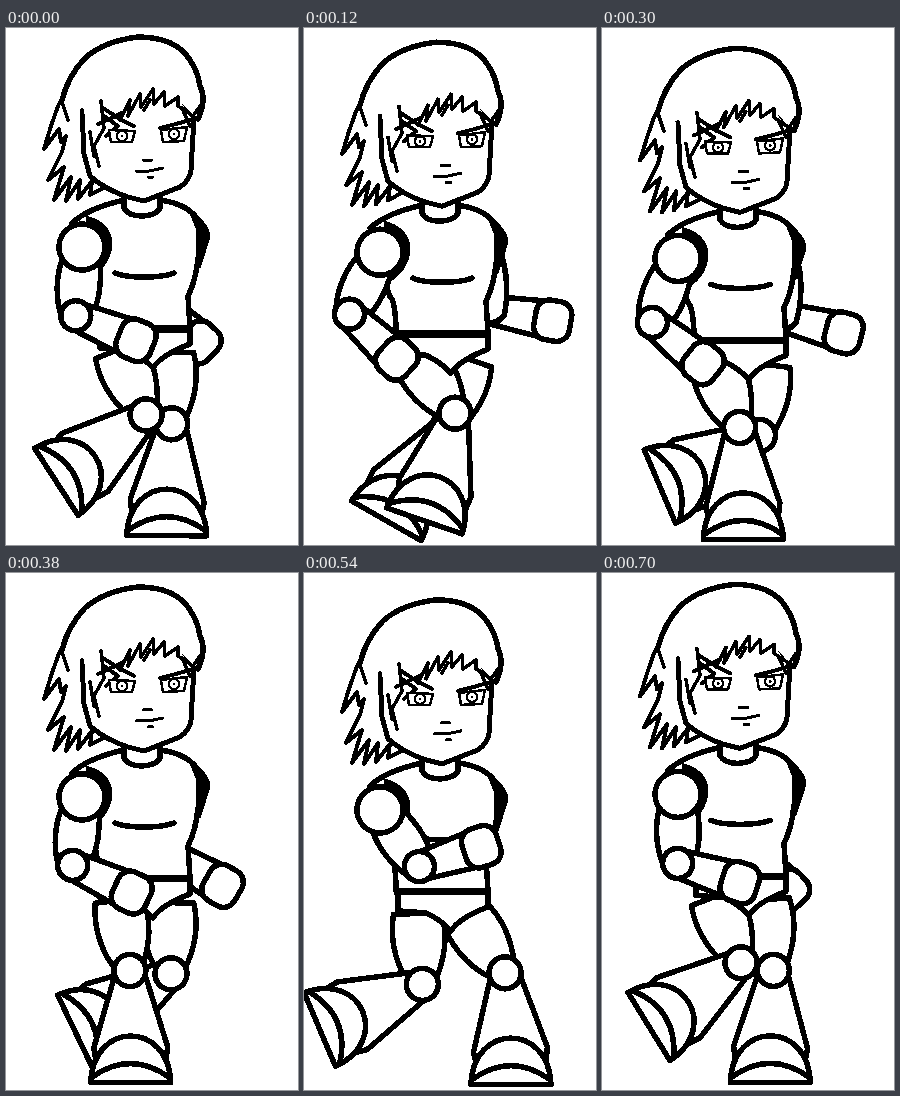
These frames come from a looping animation (292 by 517 pixels, 720 ms). An HTML page without scripts:

```html
<!DOCTYPE html>
<html lang="en">
<head>
<meta charset="utf-8">
<title>Walk cycle</title>
<style>
  @property --bob { syntax: "<length>"; inherits: true; initial-value: 0px; }
  @property --near-arm { syntax: "<angle>"; inherits: true; initial-value: 0deg; }
  @property --far-arm { syntax: "<angle>"; inherits: true; initial-value: 0deg; }
  @property --near-hip { syntax: "<angle>"; inherits: true; initial-value: 0deg; }
  @property --near-knee { syntax: "<angle>"; inherits: true; initial-value: 0deg; }
  @property --near-foot { syntax: "<angle>"; inherits: true; initial-value: 0deg; }
  @property --far-hip { syntax: "<angle>"; inherits: true; initial-value: 0deg; }
  @property --far-knee { syntax: "<angle>"; inherits: true; initial-value: 0deg; }
  @property --far-foot { syntax: "<angle>"; inherits: true; initial-value: 0deg; }

  html, body { margin: 0; width: 100%; height: 100%; overflow: hidden; background: #fff; }
  svg { display: block; width: 100%; height: 100%; }

  .figure {
    fill: #fff; stroke: #000; stroke-width: 5.5;
    stroke-linejoin: round; stroke-linecap: round;
    shape-rendering: crispEdges;
    transform: translateY(var(--bob));
    animation: walk 720ms linear infinite;
  }
  .line { fill: none; }
  .thin { stroke-width: 2.5; }
  .solid { fill: #000; stroke-width: 1; }

  .arm, .leg { transform: translate(var(--x), var(--y)) rotate(var(--turn)); }
  .forearm { transform: translateY(69px) rotate(-73deg); }
  .shin { transform: translateY(67px) rotate(var(--bend)); }
  .foot { transform: translateY(85px) rotate(var(--tilt)); }

  .near.arm { --x: 76px; --y: 219px; --turn: var(--near-arm); }
  .far.arm { --x: 176px; --y: 208px; --turn: var(--far-arm); }
  .near.leg { --x: 110px; --y: 327px; --turn: var(--near-hip); --bend: var(--near-knee); --tilt: var(--near-foot); }
  .far.leg { --x: 160px; --y: 329px; --turn: var(--far-hip); --bend: var(--far-knee); --tilt: var(--far-foot); }

  @keyframes walk {
    0%, 100% { --bob: 0px; --near-arm: 5deg; --far-arm: 26deg;
      --near-hip: -26.6deg; --near-knee: 79deg; --near-foot: 5deg;
      --far-hip: -5deg; --far-knee: 8deg; --far-foot: -3deg; }
    16.667% { --bob: 5px; --near-arm: 26deg; --far-arm: -7deg;
      --near-hip: -37.7deg; --near-knee: 53deg; --near-foot: 4deg;
      --far-hip: 14deg; --far-knee: 20deg; --far-foot: -5deg; }
    25% { --bob: 18px; --near-arm: 40deg; --far-arm: -22deg;
      --near-hip: -40deg; --near-knee: 32deg; --near-foot: 8deg;
      --far-hip: 11deg; --far-knee: 55deg; --far-foot: 3deg; }
    30.556% { --bob: 18px; --near-arm: 36deg; --far-arm: -18deg;
      --near-hip: -37deg; --near-knee: 33deg; --near-foot: 4deg;
      --far-hip: 8.5deg; --far-knee: 56.5deg; --far-foot: 4deg; }
    52.778% { --bob: 5px; --near-arm: 8deg; --far-arm: 13deg;
      --near-hip: -12deg; --near-knee: 11deg; --near-foot: 1deg;
      --far-hip: -4deg; --far-knee: 62deg; --far-foot: 7deg; }
    63.889% { --bob: 4px; --near-arm: -12deg; --far-arm: 25deg;
      --near-hip: -10.3deg; --near-knee: 37.3deg; --near-foot: -1deg;
      --far-hip: -23deg; --far-knee: 43deg; --far-foot: -5deg; }
    75% { --bob: 18px; --near-arm: -35deg; --far-arm: 43deg;
      --near-hip: -7deg; --near-knee: 73deg; --near-foot: 1deg;
      --far-hip: -38deg; --far-knee: 34deg; --far-foot: 4deg; }
    97.222% { --bob: 2.5px; --near-arm: 0deg; --far-arm: 30deg;
      --near-hip: -25.6deg; --near-knee: 80deg; --near-foot: 4deg;
      --far-hip: -10deg; --far-knee: 12deg; --far-foot: -2deg; }
  }
</style>
</head>
<body>
<svg viewBox="0 0 292 517">
  <defs>
    <g id="arm">
      <path d="M-18 12C-24 32-21 55-15 69H15C22 55 23 35 19 12Z"/>
      <g class="forearm">
        <path d="M-14 4L-18 52H18L14 4Z"/>
        <circle r="15"/>
        <rect x="-20" y="47" width="40" height="36" rx="13"/>
      </g>
    </g>
    <g id="leg">
      <path d="M-20-6C-28 22-22 48-13 64H14C24 46 32 25 28-2Z"/>
      <g class="shin">
        <path d="M-15 4L-37 77-35 90H35L37 77 15 4Z"/>
        <g class="foot">
          <path d="M-40 27C-38-35 38-35 40 27Z"/>
          <path class="line" d="M-39 22Q0-6 39 22"/>
        </g>
        <circle r="16"/>
      </g>
    </g>
  </defs>

  <g class="figure">
    <g class="far arm">
      <use href="#arm"/>
      <path d="M-18 12C-24 32-21 55-15 72Q0 90 15 76C22 55 23 35 19 12Z"/>
    </g>
    <use href="#leg" class="far leg"/>
    <use href="#leg" class="near leg"/>

    <g id="torso">
      <path d="M94 300V320L122 322Q137 329 147 340Q155 327 184 316V300Z"/>
      <path d="M118 172Q82 180 66 195L82 246Q83 261 88 266Q92 276 92 300H184L182 268Q190 252 192 230Q204 206 194 195Q184 176 154 172Z"/>
      <path class="line" stroke-width="7" d="M93 301H184"/>
      <path class="solid" d="M80 188Q104 194 106 214Q106 234 88 247L96 222Q97 204 80 195ZM182 180Q204 196 204 209L194 240 190 238Q192 216 190 200Z"/>
      <path d="M118 165V180Q122 188 136 188 151 187 154 180V168Z"/>
      <path class="line" d="M109 245Q118 249 138 249T168 245"/>
    </g>

    <g id="head">
      <path stroke-width="4" d="M62 58L52 78 45 98 38 121 53 101 55 114 60 108 56 124 42 152 58 139 48 172 65 149 60 173 74 152 72 171 86 153 84 167 103 157 110 70Z"/>
      <path stroke-width="5" d="M76 82L78 126 84 148Q100 162 122 169L138 173 174 159Q184 152 185 142L188 90 150 30 80 50Z"/>
      <path stroke="none" d="M58 68Q68 30 105 14 150 0 180 27 196 45 197 80L188 88 172 71 162 73 158 62 150 75 147 62 136 78 133 68 118 90 97 98 76 84Z"/>
      <path class="line" d="M56 72Q62 48 79 30 98 13 132 9 170 9 184 32 192 44 194 58 201 72 192 91"/>
      <path class="line" stroke-width="3.5" d="M56 74L62 92M76 82L78 126M95 73L98 100 88 118 93 138M84 104L88 128M114 92L124 72 122 88 134 66 135 79 147 61 148 76 158 64 159 78 172 69 172 78 187 88 194 78M138 82L144 72M176 80L184 98"/>
      <path class="line" stroke-width="4" d="M97 80L114 91 128 98M92 96L118 84M98 88L112 98 100 108M154 100L170 96 187 91"/>
      <path class="thin" d="M103 102L129 103 126 114 105 114ZM155 102L181 99 178 113 157 114Z"/>
      <circle class="thin" cx="116" cy="108" r="5"/>
      <circle class="thin" cx="168" cy="106" r="5"/>
      <path class="line" stroke-width="3" d="M116 108h.1M168 106h.1M137 132H146M130 143L143 143 157 140M142 149H147"/>
    </g>

    <g class="near arm">
      <use href="#arm"/>
      <circle r="23"/>
    </g>
  </g>
</svg>
</body>
</html>
```
